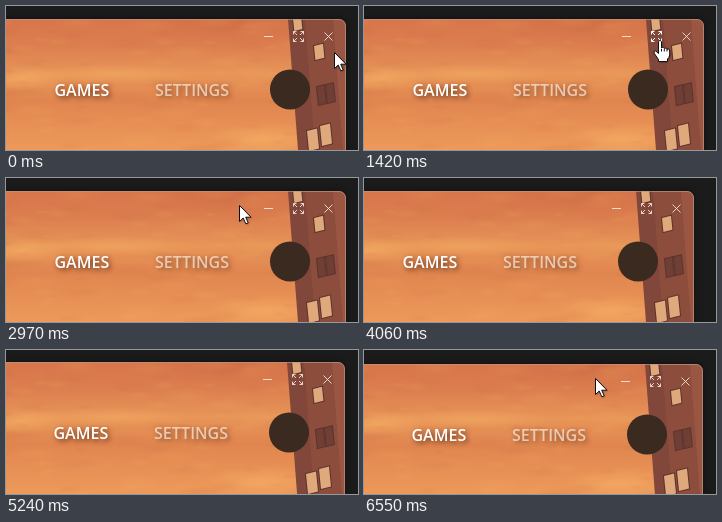
An HTML page with a canvas for the animation above (6580 ms loop, 352 px wide and 144 px high).

```html
<!DOCTYPE html>
<html lang="en">
<head>
<meta charset="utf-8">
<title>Launcher window</title>
<style>
html, body { margin: 0; width: 100%; height: 100%; overflow: hidden; background: #1b1b1b; }
canvas { display: block; }
</style>
</head>
<body>
<canvas id="stage" width="352" height="144"></canvas>
<script>
const ctx = document.getElementById('stage').getContext('2d');
const LOOP = 6580, DRAG_START = 3400, DRAG_END = 6460;
const EDGE = 340, TOP = 13, PAD = 20;
const BUTTONS = [262.5, 292.5, 322.5], BUTTON_Y = 30.5;

// key points: [time, x, y]
const pointerPath = [
  [0, 328, 46], [600, 324, 30], [1420, 296, 34], [2150, 264, 31], [2970, 233, 27]
];
const dragPath = [
  [DRAG_START, 0, 0], [4060, -10, 0], [4500, 2, 4], [4820, -6, 4], [5050, 2, -1],
  [5240, -1, -1], [5880, -3, 7], [6200, 2, 3], [DRAG_END, -1, 1]
];

const smooth = k => k * k * (3 - 2 * k);
const dwell = k => smooth(smooth(k));

function along(path, t, ease) {
  const i = path.findIndex(p => p[0] > t);
  if (i < 1) return path.at(i).slice(1);
  const a = path[i - 1], b = path[i];
  const k = ease((t - a[0]) / (b[0] - a[0]));
  return [a[1] + (b[1] - a[1]) * k, a[2] + (b[2] - a[2]) * k];
}

function random(seed) {
  return () => (seed = (seed * 16807) % 2147483647) / 2147483647;
}

function cloud(c, x, y, rx, ry, rgb, alpha) {
  c.save();
  c.translate(x, y);
  c.scale(rx, ry);
  const g = c.createRadialGradient(0, 0, 0, 0, 0, 1);
  g.addColorStop(0, `rgba(${rgb},${alpha})`);
  g.addColorStop(1, `rgba(${rgb},0)`);
  c.fillStyle = g;
  c.fillRect(-1, -1, 2, 2);
  c.restore();
}

function paintSky(c) {
  const sky = c.createLinearGradient(0, TOP, 0, 150);
  ['#d7754b', '#dc7f4f', '#e89558', '#e0854f', '#e89156', '#ed9c5c']
    .forEach((color, i, all) => sky.addColorStop(i / (all.length - 1), color));
  c.fillStyle = sky;
  c.fillRect(-PAD, -PAD, 380, 190);

  const light = '250,184,104', dark = '196,98,62';
  cloud(c, 15, 72, 50, 13, light, .5);
  cloud(c, 110, 68, 80, 10, light, .35);
  cloud(c, 260, 132, 60, 16, light, .45);
  cloud(c, 230, 16, 110, 24, dark, .3);

  const rnd = random(41);
  for (let i = 0; i < 110; i++) {
    const size = 6 + rnd() * 22;
    cloud(c, rnd() * 320 - 15, TOP + rnd() * 140, size, size * .3, rnd() < .5 ? light : dark, .12);
  }
}

// vertical face of the tower, leaning right as it goes down
function wall(c, x, color) {
  c.fillStyle = color;
  c.beginPath();
  c.moveTo(x, TOP);
  c.lineTo(x + 10, 144);
  c.lineTo(x + 12, 170);
  c.lineTo(400, 170);
  c.lineTo(400, TOP);
  c.fill();
}

function pane(c, x, y, w, h, glow) {
  c.save();
  c.transform(1, -.25, .1, 1, x, y);
  c.fillStyle = '#5d342c';
  c.fillRect(-1, -1, w + 2, h + 2);
  c.fillStyle = glow;
  c.fillRect(0, 0, w, h);
  c.restore();
}

function paintScene() {
  const scene = document.createElement('canvas');
  scene.width = 380;
  scene.height = 190;
  const c = scene.getContext('2d');
  c.translate(PAD, PAD);
  paintSky(c);

  wall(c, 282, '#80473a');
  wall(c, 299, '#8c4d3d');
  wall(c, 327, '#9a5643');

  const lit = '#e0a97c', dim = '#6f3e34';
  pane(c, 287, 12, 8, 13, lit);
  pane(c, 308, 40, 9, 14, lit);
  for (let i = 0; i < 2; i++) {
    pane(c, 311 + i * 9, 81 - i * 2, 7, 18, dim);
    pane(c, 301 + i * 13, 125 - i * 5, 10, 20, lit);
  }
  return scene;
}

function line(...pts) {
  ctx.beginPath();
  for (let i = 0; i < pts.length; i += 2) ctx.lineTo(pts[i], pts[i + 1]);
  ctx.stroke();
}

function drawIcons(hover) {
  ctx.lineWidth = 1;
  BUTTONS.forEach((x, i) => {
    ctx.save();
    ctx.translate(x, BUTTON_Y);
    ctx.strokeStyle = hover === i ? '#fff' : 'rgba(255,240,228,.82)';
    if (i === 0) line(-4.5, 0, 4.5, 0);
    if (i === 1) {
      for (const sx of [-1, 1]) for (const sy of [-1, 1]) {
        line(2 * sx, 5 * sy, 5 * sx, 5 * sy, 5 * sx, 2 * sy);
        line(1.5 * sx, 1.5 * sy, 5 * sx, 5 * sy);
      }
    }
    if (i === 2) for (const s of [-1, 1]) line(-4, -4 * s, 4, 4 * s);
    ctx.restore();
  });
}

function label(text, x, color) {
  ctx.save();
  ctx.font = '600 16px "Open Sans", "Noto Sans", sans-serif';
  ctx.shadowColor = 'rgba(60,25,10,.8)';
  ctx.shadowBlur = 5;
  ctx.shadowOffsetX = ctx.shadowOffsetY = 2;
  ctx.fillStyle = color;
  ctx.fillText(text, x, 90);
  ctx.restore();
}

const arrow = new Path2D('M.5 .5V16.5L4.2 13L6.8 18.8L9.2 17.8L6.7 12.2H12Z');
const hand = new Path2D('M-1.5 1.5Q0 -1 1.5 1.5V8Q3 6 4.3 8.5Q6 7 7 9.3Q9.5 8 9.7 11V15Q9 18 7.5 19V21.5H-1.5V19.5L-6 13Q-6.5 10.5 -4.2 11L-1.5 13.5Z');

function drawPointer(x, y, shape) {
  ctx.save();
  ctx.translate(Math.round(x), Math.round(y));
  ctx.shadowColor = 'rgba(0,0,0,.35)';
  ctx.shadowBlur = 2;
  ctx.shadowOffsetX = ctx.shadowOffsetY = 1;
  ctx.fillStyle = '#fff';
  ctx.fill(shape);
  ctx.shadowColor = 'transparent';
  ctx.strokeStyle = '#111';
  ctx.lineWidth = 1;
  ctx.stroke(shape);
  if (shape === hand) for (const fx of [1.5, 4.3, 7]) line(fx, 9, fx, 11.5);
  ctx.restore();
}

const scene = paintScene();

function drawWindow(dx, dy, hover) {
  ctx.save();
  ctx.translate(dx, dy);
  const frame = new Path2D();
  frame.roundRect(-60, TOP, EDGE + 60, 200, 7);
  ctx.save();
  ctx.shadowColor = 'rgba(0,0,0,.45)';
  ctx.shadowBlur = 6;
  ctx.fill(frame);
  ctx.restore();
  ctx.save();
  ctx.clip(frame);
  ctx.drawImage(scene, -PAD, -PAD);
  ctx.restore();

  const rim = new Path2D();
  rim.roundRect(-60, TOP + .5, EDGE + 59.5, 200, 6.5);
  ctx.strokeStyle = 'rgba(190,150,128,.7)';
  ctx.lineWidth = 1;
  ctx.stroke(rim);

  drawIcons(hover);
  label('GAMES', 48.5, '#fff');
  label('SETTINGS', 149, 'rgba(255,240,230,.68)');
  ctx.fillStyle = '#3b2a20';
  ctx.beginPath();
  ctx.arc(284, 83.5, 20, 0, Math.PI * 2);
  ctx.fill();
  ctx.restore();
}

function hoverAt(x, y) {
  if (Math.abs(y - BUTTON_Y) > 8) return -1;
  return BUTTONS.findIndex(bx => Math.abs(x - bx) < 9);
}

function draw(now) {
  const t = now % LOOP;
  const [dx, dy] = along(dragPath, t, smooth).map(Math.round);
  const pointing = t < DRAG_START;
  const [x, y] = pointing ? along(pointerPath, t, dwell) : [232 + dx, 27 + dy];
  const hover = pointing ? hoverAt(x, y) : -1;

  ctx.fillStyle = '#1b1b1b';
  ctx.fillRect(0, 0, 352, 144);
  drawWindow(dx, dy, hover);
  if (pointing || t >= DRAG_END) drawPointer(x, y, hover < 0 ? arrow : hand);
}

const start = performance.now();
function tick() {
  draw(performance.now() - start);
  requestAnimationFrame(tick);
}
tick();
</script>
</body>
</html>
```
